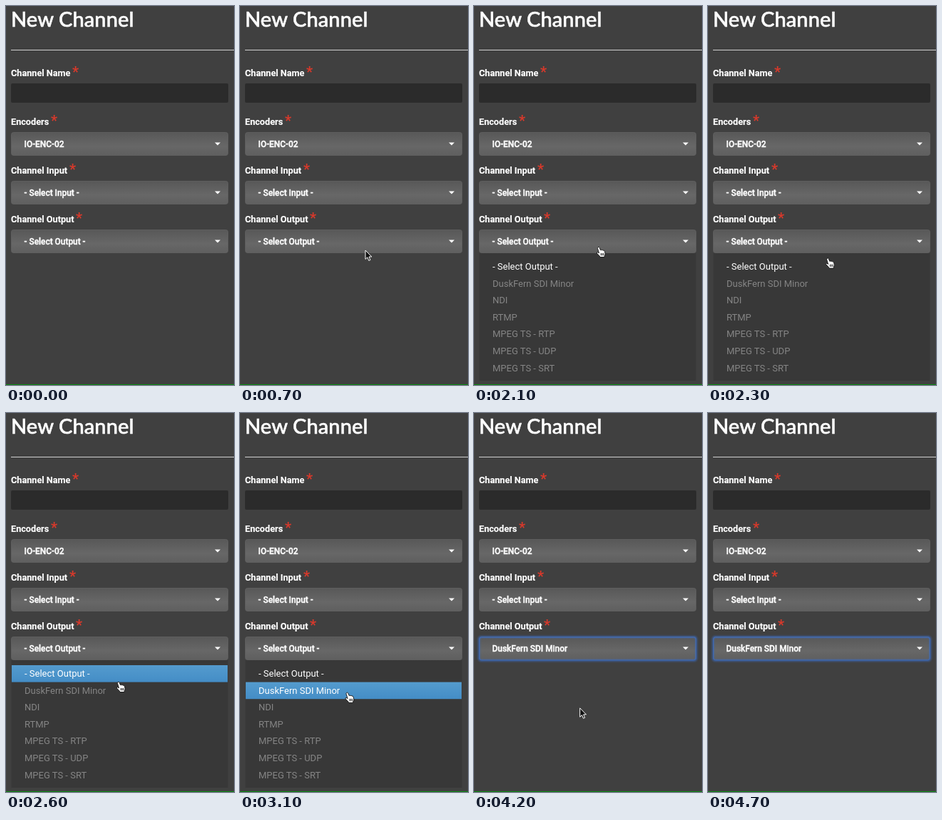
An HTML page that plays this animation: 320 px wide and 529 px high, repeating every 5200 ms.

```html
<!DOCTYPE html>
<html lang="en">
<head>
<meta charset="utf-8">
<title>New Channel</title>
<style>
  html, body { margin: 0; width: 100%; height: 100%; overflow: hidden; background: #404040; }
  svg { display: block; width: 320px; height: 529px; }
  text { font-family: Roboto, "Liberation Sans", sans-serif; fill: #fff; white-space: pre; }
  .title { font: 500 29px Lato, "Open Sans", sans-serif; letter-spacing: .1px; stroke: #fff; stroke-width: .6; }
  .label { font-size: 12.7px; font-weight: 700; stroke: #fff; stroke-width: .15; }
  .star { font-size: 20px; font-weight: 700; fill: #d8392b; }
  .value { font-size: 11.9px; font-weight: 500; stroke: #fff; stroke-width: .4; }
  .item { font-size: 13px; }
</style>
</head>
<body>
<svg id="stage" viewBox="0 0 320 529">
  <defs>
    <linearGradient id="button" x2="0" y2="1">
      <stop offset="0" stop-color="#585858"/>
      <stop offset=".6" stop-color="#676767"/>
      <stop offset="1" stop-color="#5f5f5f"/>
    </linearGradient>
    <linearGradient id="active" x2="0" y2="1">
      <stop offset="0" stop-color="#549bce"/>
      <stop offset="1" stop-color="#448dc6"/>
    </linearGradient>
    <filter id="blur" x="-5%" y="-30%" width="110%" height="160%">
      <feGaussianBlur stdDeviation="1.1"/>
    </filter>
  </defs>
  <rect width="320" height="529" fill="#404040"/>
  <text class="title" x="7" y="29">New Channel</text>
  <path d="M7 61.5H320" stroke="#d0d0d0"/>
  <rect x="7" y="108" width="305" height="27" rx="2" fill="#2b2b2b"/>
  <g id="form"></g>
  <g id="focus" fill="none" stroke="#3a6cc4">
    <rect x="7" y="312.5" width="305" height="33" rx="3" stroke-width="3" opacity=".6" filter="url(#blur)"/>
    <rect x="7.5" y="313" width="304" height="32" rx="3" opacity=".8"/>
  </g>
  <g id="menu">
    <rect x="7.5" y="345" width="304" height="178" fill="#383838"/>
    <rect id="highlight" x="8" width="303" height="23.6" fill="url(#active)"/>
  </g>
  <g id="cursor">
    <path id="arrow" d="M0 0V12.4L2.8 9.8L4.8 14.4L6.9 13.5L5 9H8.8Z"
      fill="#111" stroke="#fff" stroke-linejoin="round"/>
    <path id="hand" d="M0 .7q1.3-1 2.2.6L3.5 4.7q1-.8 2 .1q1.2-.6 1.9.4q1.5-.3 2 1.2L10.1 9.5q0 2-1 3.4V14.5H3L2.3 13.1L-1.5 9.1q-.6-1.6 1.2-1.4L1.5 8.8L-.5 2.5q-.2-1.2.5-1.8zM4.2 9v3.3M6 9v3.3M7.8 9v3.3"
      fill="#fff" stroke="#111" stroke-width=".9" stroke-linejoin="round"/>
  </g>
  <path d="M0 528.5H320" stroke="#0a8a12"/>
</svg>
<script>
const LOOP = 5200, STEP = 100, OPEN = 2100, CLOSE = 3800;
const ROW_TOP = 352, ROW = 23.6;
const $ = id => document.getElementById(id);
const device = "DuskFern SDI Minor";
const options = ["- Select Output -", device, "NDI", "RTMP", "MPEG TS - RTP", "MPEG TS - UDP", "MPEG TS - SRT"];

function add(parent, tag, attrs, content = "") {
  const node = document.createElementNS("http://www.w3.org/2000/svg", tag);
  for (const key in attrs) node.setAttribute(key, attrs[key]);
  node.textContent = content;
  return parent.appendChild(node);
}

function addLabel(content, y, starX) {
  add($("form"), "text", { class: "label", x: 7, y }, content);
  add($("form"), "text", { class: "star", x: starX, y: y + 1.2 }, "*");
}

function addSelect(content, y) {
  const form = $("form");
  add(form, "rect", { x: 7.5, y: y + .5, width: 304, height: 32, rx: 3, fill: "url(#button)", stroke: "#646464", "stroke-width": .8 });
  add(form, "path", { d: `M293 ${y + 14.5}h8l-4 4z`, fill: "#fff" });
  return add(form, "text", { class: "value", x: 25.6, y: y + 21 }, content);
}

addLabel("Channel Name", 98, 93);
addLabel("Encoders", 166, 63);
addLabel("Channel Input", 234, 89);
addLabel("Channel Output", 302, 98);
addSelect("IO-ENC-02", 176);
addSelect("- Select Input -", 244);
const output = addSelect(options[0], 312);
const items = options.map((name, i) =>
  add($("menu"), "text", { class: "item", x: 26, y: 368 + i * ROW }, name));

// Pointer tip: time, x, y
const route = [
  [100, 178, 443], [400, 178, 402], [500, 178, 402], [600, 184, 360], [700, 176, 341],
  [1100, 187, 343], [1400, 176, 344], [1600, 176, 347], [1700, 174, 336], [2100, 174, 336],
  [2600, 157, 375], [2700, 156, 377], [3200, 148, 393], [3700, 147, 390], [3800, 147, 388],
  [4100, 147, 388], [4700, 157, 531]
];

function pointerAt(t) {
  const i = Math.max(1, route.findIndex(key => key[0] >= t));
  const [t0, x0, y0] = route[i - 1], [t1, x1, y1] = route[i];
  const k = (t - t0) / (t1 - t0);
  return [x0 + (x1 - x0) * k, y0 + (y1 - y0) * k];
}

const show = (id, on) => $(id).setAttribute("visibility", on ? "visible" : "hidden");

function render(now) {
  const t = Math.floor(now % LOOP / STEP) * STEP;
  const visible = t >= 100 && t < 4700;
  const open = t >= OPEN && t < CLOSE;
  const [x, y] = visible ? pointerAt(t) : [0, 0];
  const row = open ? Math.floor((y - ROW_TOP) / ROW) : -1;
  const pointing = t >= 1700 && t < CLOSE;

  $("cursor").setAttribute("transform", `translate(${x} ${y})`);
  show("arrow", visible && !pointing);
  show("hand", visible && pointing);
  $("menu").style.display = open ? "" : "none";
  show("highlight", row >= 0);
  $("highlight").setAttribute("y", ROW_TOP + row * ROW);
  items.forEach((item, i) => item.style.fill = i === 0 || i === row ? "#fff" : "#858585");
  show("focus", t >= CLOSE);
  output.textContent = t >= CLOSE ? device : options[0];
}

const start = performance.now();
function tick() {
  render(performance.now() - start);
  requestAnimationFrame(tick);
}
tick();
</script>
</body>
</html>
```
